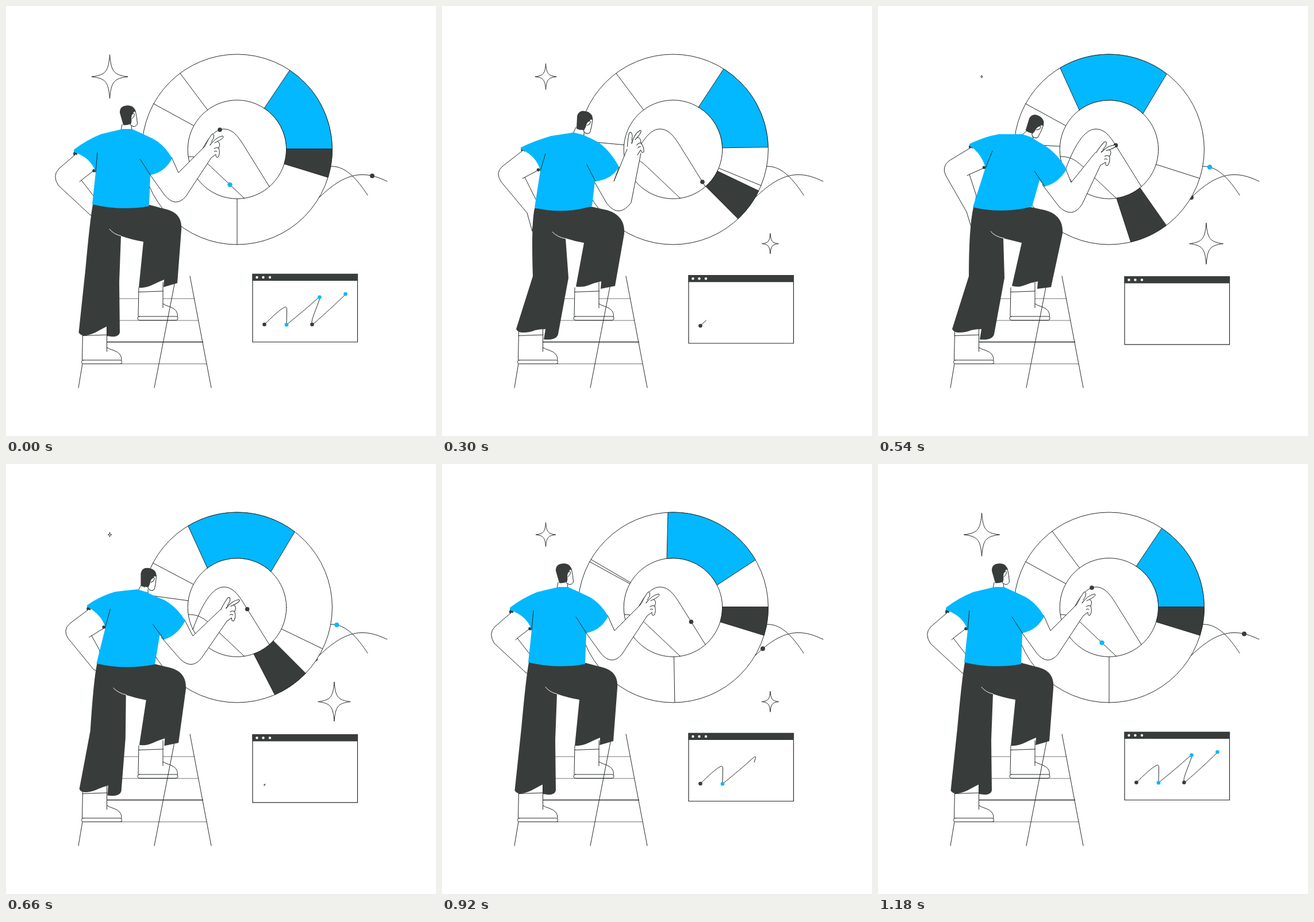
An HTML page for the animation above (1.2 s loop, 748x748 px).

```html
<!DOCTYPE html>
<html lang="en">
<head>
<meta charset="utf-8">
<title>Chart presentation</title>
<style>
html, body { margin: 0; width: 100%; height: 100%; overflow: hidden; background: #fff; }
svg { display: block; width: 100vw; height: 100vh; }
.l { fill: none; stroke: #252a28; stroke-width: 1; stroke-linejoin: round; stroke-linecap: round; }
.w { fill: #fff; }
.d { fill: #383d3b; }
.b { fill: #03b8ff; }
.star { vector-effect: non-scaling-stroke; }
.thin { stroke-width: .65; }
</style>
</head>
<body>
<svg viewBox="0 0 748 748">
  <defs>
    <g id="boot">
      <path class="w" d="M133 560L132.500 616H201Q202 602 187 599Q179 597 175.500 593V557Z"/>
      <path class="l" d="M133.500 566L132.500 616M133 573.500L176 572M175.500 557V601M175.500 594Q180 597 187 599Q202 604 201 616"/>
      <rect class="l w" x="131.500" y="616" width="70" height="6.500" rx="3"/>
    </g>
    <path id="spark" class="l star" d="M0 -38C2.500 -10 6 -3 31.500 0C6 3 2.500 10 0 38C-2.500 10 -6 3 -31.500 0C-6 -3 -2.500 -10 0 -38Z"/>
  </defs>

  <path id="arcP" class="l" d="M548 281L567 279C592 279 612 303 629 329"/>
  <path id="arcQ" class="l" d="M520 356L546 332C568 311 592 294 618 293.500C634 293 648 298 663 305"/>
  <circle id="dotP" class="b" r="4.200"/>
  <circle id="dotQ" class="d" r="4"/>

  <circle class="w" cx="402" cy="249.500" r="86"/>
  <path id="fall" class="l" d="M317 262C335 261 347 270 360 283L414 334L434 353"/>
  <circle id="dotFall" class="b" r="4.200"/>
  <path class="w" fill-rule="evenodd" d="M236.500 249.500a165.500 165.500 0 1 1 331 0a165.500 165.500 0 1 1 -331 0M316 249.500a86 86 0 1 0 172 0a86 86 0 1 0 -172 0"/>
  <circle class="l" cx="402" cy="249.500" r="165.500"/>
  <circle class="l" cx="402" cy="249.500" r="85.800"/>
  <path id="spokes" class="l"/>
  <path id="blueSlice" class="l b"/>
  <path id="darkSlice" class="l d"/>
  <path id="hill" class="l" d="M325 288C340 246 358 214 379 214C400 214 410 238 427 264Q443 290 458 314"/>
  <circle id="dotHill" class="d" r="3.800"/>

  <g id="win">
    <rect class="l w" style="stroke-width:1.200" x="429" y="466.500" width="182.500" height="118"/>
    <rect class="d" x="428.400" y="465.700" width="183.700" height="12.300"/>
    <g class="w"><circle cx="436.500" cy="472" r="2.200"/><circle cx="447.500" cy="472" r="2.200"/><circle cx="459" cy="472" r="2.200"/></g>
    <path id="graph" class="l" style="stroke-linecap:butt" pathLength="1" d="M449.500 554C463 541 476 528 485 524Q489 522 488.500 530L488 554.500C507 539 524 525 541 509.500Q547 504 545 511C541 524 532 543 532 550Q532 556 537 551C554 536 572 520 591 501"/>
    <g id="marks"></g>
  </g>

  <use id="starA" href="#spark"/>
  <use id="starB" href="#spark"/>

  <path class="l" d="M126 664L152 509M320 470L357 664M158 622.500H202"/>
  <path class="l thin" d="M152 509H328M146 547H335M134 622.500H349"/>
  <path class="l" style="stroke-width:1.300" d="M140 584.500H342.500"/>
  <use href="#boot"/>
  <use href="#boot" transform="translate(97.500 -76)"/>
  <path class="l" d="M296.700 465L258 664"/>

  <circle id="cuffA" class="d" r="3.600"/>
  <path id="backArm" class="l w"/>
  <path id="backFold" class="l"/>
  <circle id="cuffB" class="d" r="2.800"/>
  <path id="pants" class="d"/>
  <path id="crease" class="l" style="stroke:#fff"/>
  <path id="neck" class="l w"/>
  <g id="head">
    <path class="l w" d="M0 -10L12 -8Q15 4 15.500 15Q14 20 8 19.500L4 17Z"/>
    <path class="d" d="M-9 17L-15 -4Q-16 -17 0 -17Q11 -16 12.500 -6Q9 -7 8 -3L5 4Q6 10 4.500 15Q-4 18 -9 17Z"/>
    <path class="l w" d="M5.500 0Q9 -6 10.500 -1Q10 4 6 6"/>
  </g>
  <path id="arm" class="l w"/>
  <path id="shirt" class="b"/>
  <path id="folds" class="l"/>
  <g id="hand">
    <path class="w" d="M-12 -1L0 -22L12 -8L11 18L-1 19Z"/>
    <path class="l w" d="M-12 -1Q-6 -14 0 -22Q5 -24 3 -15L-1 -8"/>
    <path class="l w" d="M-3 -4Q6 -14 12 -8Q15 -5 12 2Q15 11 11 18Q7 20 7 13L-1 19"/>
    <path class="l" d="M12 2Q8 0 4 3M9 8Q7 6 4 8"/>
    <path class="l w" d="M-3 -3Q7 -17 19 -19Q23 -17 13 -11L5 -7"/>
  </g>
</svg>
<script>
const LOOP = 1200, STEP = 20;
const TIMES = [0, 140, 300, 540, 760, 920, 1180, 1200];
const POSES = [0, 1, 2, 3, 4, 0, 0];   // rest, start, reach, lean, return, rest
const $ = id => document.getElementById(id);
const set = (id, name, value) => $(id).setAttribute(name, value);

// Monotone cubic through one value per key time
function track(values) {
  const v = [...values, values[0]], n = v.length - 1;
  const grade = i => (v[i + 1] - v[i]) / (TIMES[i + 1] - TIMES[i]);
  const slope = v.map((_, i) => {
    if (i === 0 || i === n) return 0;
    const a = grade(i - 1), b = grade(i);
    return a * b > 0 ? 2 * a * b / (a + b) : 0;
  });
  return t => {
    let i = 0;
    while (i < n - 1 && t >= TIMES[i + 1]) i++;
    const h = TIMES[i + 1] - TIMES[i], u = (t - TIMES[i]) / h, q = u * u * (3 - 2 * u);
    return v[i] * (1 - q) + v[i + 1] * q
      + h * u * (1 - u) * ((1 - u) * slope[i] - u * slope[i + 1]);
  };
}

// Blends the numbers of five strings that share one structure
function morph(...poses) {
  const num = /-?\d+(\.\d+)?/g;
  const sets = poses.map(p => p.match(num).map(Number));
  const tracks = sets[0].map((_, k) => track(POSES.map(p => sets[p][k])));
  return t => { let k = 0; return poses[0].replace(num, () => tracks[k++](t).toFixed(2)); };
}

const body = {
  pants: morph(
    "M151 345Q146 372 138 460L126.500 568Q129 573 138 573.500Q151 571 159 566Q168 561 176 557L176 574Q196 578 198 568L197 480L200 400Q220 407 239 410L231 490Q243 491 255 485Q265 480 275 476L274 489L298 482L305 390C307 366 294 356 272 352L250 346Z",
    "M156 348Q150 365 151 470L128 566Q131 571 140 571Q152 571 161 566Q171 562 179 560L177 578Q197 582 200 571L212 472L208 402Q225 407 242 411L232 489Q244 491 256 486Q266 481 276 478L275 491L300 485L310 391C313 368 298 357 276 354L255 349Z",
    "M161 352Q155 380 158 470L129 562Q132 568 141 568Q153 568 162 564Q171 562 180 562L177 580Q199 582 202 571L220 473L215 404Q230 409 247 412L233 488Q245 490 257 485Q267 481 277 479L276 492L301 487L317 396C319 371 303 358 282 354L260 349Z",
    "M166 350Q158 385 158 470L129 562Q132 568 141 568Q153 568 162 564Q171 562 180 562L177 580Q199 582 202 571L220 473L218 404Q234 408 250 412L233 487Q245 490 257 485Q267 481 278 479L277 492L301 489L321 396C323 370 307 358 285 354L267 350Z",
    "M152 345Q147 372 138 460L126.500 568Q129 573 138 573.500Q151 571 159 566Q168 561 176 557L176 574Q196 578 199 568L198 480L201 400Q220 407 239 410L231 490Q243 491 255 485Q265 480 275 476L274 489L299 482L306 390C308 366 295 356 273 352L251 346Z"),
  crease: morph(
    "M180 388Q187 397 200 400", "M185 390Q193 399 209 402", "M192 393Q200 402 216 405",
    "M196 392Q203 401 219 404", "M180 388Q188 397 201 400"),
  shirt: morph(
    "M118 250Q140 233 165 223Q185 218 203 214L219 214Q235 221 256 231Q276 242 289 265Q277 289 251 294L251 294L249 348Q200 357 150 345L156 289Q148 264 118 254Z",
    "M122 252Q145 234 169 225Q189 220 207 216L223 217Q240 224 262 233Q281 244 294 266Q281 292 257 297L256 297L253 350Q204 360 155 347L160 290Q151 265 122 255Z",
    "M137 246Q162 234 190 226Q210 223 229 220L245 224Q259 230 272 237Q293 252 308 280Q295 302 267 305L266 305L261 348Q210 363 161 351L171 287Q165 261 137 249Z",
    "M159 240Q186 227 210 223Q231 223 251 223L266 228Q278 236 291 243Q314 259 328 284Q314 308 290 314L281 303L268 349Q215 362 165 350L187 281Q179 255 159 243Z",
    "M124 250Q146 231 171 222Q190 217 208 214L224 217Q241 224 262 232Q283 243 296 264Q282 291 259 297L255 294L251 348Q200 357 151 345L160 288Q153 265 124 253Z"),
  folds: morph(
    "M159 255L156 289M233 266L251 294", "M165 257L161 290M237 268L257 297",
    "M180 257L171 287M252 276L267 305", "M199 252L187 282M272 287L290 314",
    "M165 253L159 289M240 271L259 297"),
  backArm: morph(
    "M121 258L92 283Q80 295 91 312L147 364L160 360L152 330L131 303L157 283",
    "M126 259L94 285Q81 296 92 312L145 363L152 380L156 336L133 303L160 285",
    "M141 251L105 279Q92 290 103 306L148 360L157 392L164 338L144 298L172 283",
    "M162 246L124 269Q110 280 118 295L154 358L162 384L171 330L159 293L188 280",
    "M127 258L98 284Q86 296 98 311L150 357L165 350L155 321L138 303L161 286"),
  backFold: morph(
    "M131 303L128 306", "M133 303L130 306", "M144 298L140 300", "M159 293L155 295", "M138 303L134 306"),
  neck: morph(
    "M202 206L200 216L219 216L218 207", "M209 208L207 218L224 219L226 212",
    "M233 211L228 222L247 225L247 220", "M259 217L251 224L270 231L269 226",
    "M211 207L209 217L226 218L226 211"),
  arm: morph(
    "M346 244L300 290L288 263L248 290L276 329Q295 352 313 331L357 264",
    "M346 244L302 291L292 264L253 293L280 333Q299 355 317 333L357 264",
    "M322 249L299 305L308 280L263 302L287 344Q308 370 329 342L346 256",
    "M378 255L336 307L326 282L286 311L315 349Q338 371 355 345L387 277",
    "M366 250L312 292L295 262L255 293L289 331Q308 350 325 330L379 269")
};
const place = {
  head: morph("translate(213 190) rotate(0)", "translate(222.5 193) rotate(3)", "translate(248 200) rotate(19)",
    "translate(273.5 207) rotate(33)", "translate(223 191) rotate(2)"),
  hand: morph("translate(358 245) rotate(0)", "translate(358 245) rotate(0)", "translate(334 241) rotate(-22)",
    "translate(391 258) rotate(8)", "translate(377.5 250) rotate(-4)")
};
const cuffA = { cx: [120.5, 124.5, 141, 161.5, 127], cy: [257, 258, 250.5, 245, 257] };
const cuffB = { cx: [153, 155.5, 167.5, 184.5, 157], cy: [286.5, 288, 285, 281, 286] };
const byPose = list => track(POSES.map(p => list[p]));
const cuffs = [["cuffA", cuffA], ["cuffB", cuffB]].flatMap(([id, c]) =>
  Object.keys(c).map(k => [id, k, byPose(c[k])]));

// Ring angles in degrees, clockwise from the right
const ring = {
  blueOut: [303.6, 303.6, 302.1, 239, 239, 266.9, 303.6],
  blueIn: [303.4, 303.4, 301, 232.9, 232.9, 262.7, 303.4],
  blueOutEnd: [359.7, 359.7, 358.6, 307.3, 307.3, 330, 359.7],
  blueInEnd: [359.4, 359.4, 358.2, 313.4, 313.4, 333.1, 359.4],
  darkOut: [-0.3, -0.3, 25.8, 53, 29.8, -0.3, -0.3],
  darkIn: [-0.6, -0.6, 26, 51.2, 29.5, -0.6, -0.6],
  darkOutEnd: [17.1, 17.1, 46.9, 76.8, 51, 17.1, 17.1],
  darkInEnd: [17.1, 17.1, 48.5, 81.3, 53.5, 17.1, 17.1],
  low: [90, 80.2, 22.3, 17.7, 40, 89, 90],
  left: [208.7, 206.7, 185.3, 183.6, 194.4, 208.7, 208.7],
  upper: [233.2, 233.2, 233.2, 208.7, 207.6, 210.3, 233.2]
};
for (const k in ring) ring[k] = track(ring[k]);

const polar = (deg, r) => {
  const a = deg * Math.PI / 180;
  return `${(402 + r * Math.cos(a)).toFixed(2)} ${(249.5 + r * Math.sin(a)).toFixed(2)}`;
};
const R = 165.5, r = 85.8;
const slice = (o0, o1, i0, i1) =>
  `M${polar(i0, r)}L${polar(o0, R)}A${R} ${R} 0 0 1 ${polar(o1, R)}L${polar(i1, r)}A${r} ${r} 0 0 0 ${polar(i0, r)}Z`;

// Dots follow curves by their x position
const riders = [
  ["dotHill", "hill", [372, 429.5, 453, 413.5, 427, 433.5, 372]],
  ["dotFall", "fall", [389.5, 424, 424, 424, 424, 424, 389.5]],
  ["dotQ", "arcQ", [637, 600, 533, 545, 533, 558, 637]],
  ["dotP", "arcP", [552, 552, 552, 577, 572, 552, 552]]
].map(([dot, path, xs]) => [dot, $(path), track(xs)]);

function pointAtX(path, x) {
  let lo = 0, hi = path.getTotalLength(), p;
  for (let i = 0; i < 16; i++) {
    const mid = (lo + hi) / 2;
    p = path.getPointAtLength(mid);
    if (p.x < x) lo = mid; else hi = mid;
  }
  return p;
}

const marks = [[449.5, 554, "d", 0], [488, 554.5, "b", 0.29], [545.5, 506.5, "b", 0.61],
  [532.5, 554, "d", 0.75], [590.5, 501, "b", 0.96]].map(([x, y, cls, at]) => {
  const c = document.createElementNS("http://www.w3.org/2000/svg", "circle");
  c.setAttribute("cx", x);
  c.setAttribute("cy", y);
  c.setAttribute("class", cls);
  $("marks").append(c);
  return { c, at };
});
const drawn = track([1, 0.515, 0.05, 0, 0.035, 0.587, 1]);
const sizeA = track([1, 0.935, 0.59, 0.06, 0.19, 0.55, 0.985]);
const sizeB = track([0, 0.16, 0.46, 0.94, 0.82, 0.47, 0]);

function star(id, x, y, s) {
  set(id, "visibility", s > 0.01 ? "visible" : "hidden");
  set(id, "transform", `translate(${x} ${y}) scale(${Math.max(s, 0.001)})`);
}

function draw(t) {
  for (const id in body) set(id, "d", body[id](t));
  for (const id in place) set(id, "transform", place[id](t));
  for (const [id, k, f] of cuffs) set(id, k, f(t));

  const a = {};
  for (const k in ring) a[k] = ring[k](t);
  set("spokes", "d", [a.low, a.left, a.upper].map(d => `M${polar(d, r)}L${polar(d, R)}`).join(""));
  set("blueSlice", "d", slice(a.blueOut, a.blueOutEnd, a.blueIn, a.blueInEnd));
  set("darkSlice", "d", slice(a.darkOut, a.darkOutEnd, a.darkIn, a.darkInEnd));

  for (const [dot, path, x] of riders) {
    const p = pointAtX(path, x(t));
    set(dot, "cx", p.x);
    set(dot, "cy", p.y);
  }

  set("win", "transform", `translate(0 ${2.25 * (1 - Math.cos(2 * Math.PI * t / LOOP))})`);
  const p = drawn(t);
  set("graph", "stroke-dasharray", `${p} 2`);
  set("graph", "visibility", p > 0.001 ? "visible" : "hidden");
  for (const { c, at } of marks)
    c.setAttribute("r", 3.3 * Math.min(1, Math.max(0, (p - at) / 0.03)));

  star("starA", 180.5, 123, sizeA(t));
  star("starB", 571, 413.5, sizeB(t));
}

function tick() {
  draw(Math.floor(performance.now() % LOOP / STEP) * STEP);
  requestAnimationFrame(tick);
}
tick();
</script>
</body>
</html>
```
